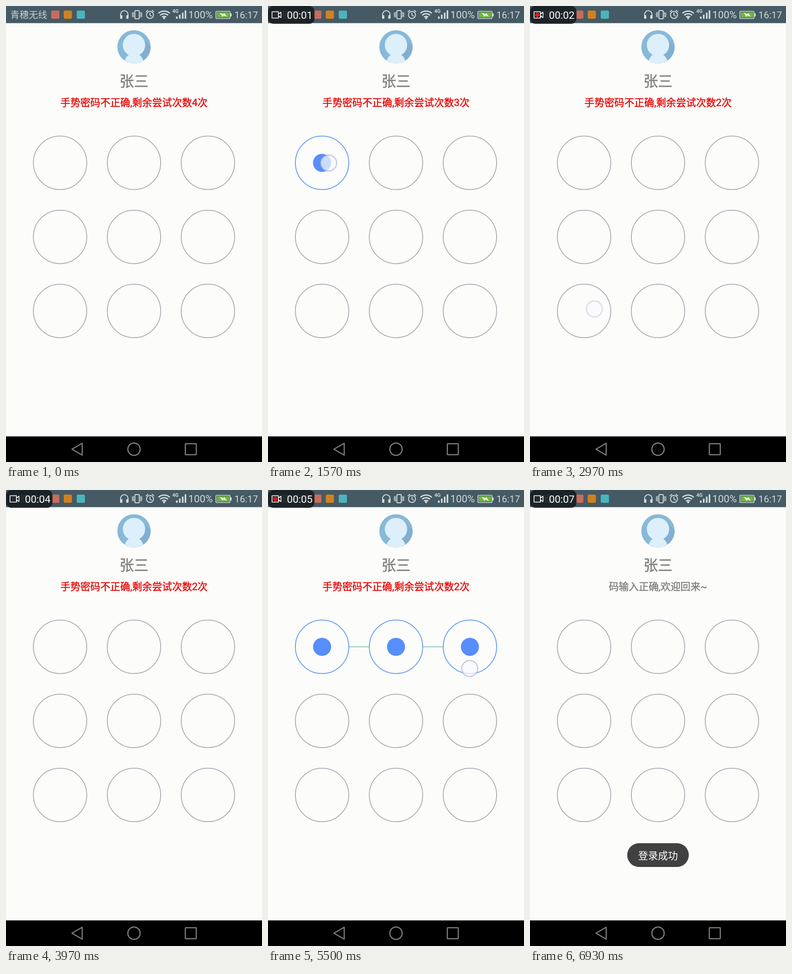
An HTML page that plays this animation: 561x998 px, repeating every 6960 ms.

```html
<!DOCTYPE html>
<html lang="zh-CN">
<head>
<meta charset="utf-8">
<title>手势密码</title>
<style>
  html, body { margin: 0; width: 100%; height: 100%; overflow: hidden; background: #fcfcfa; }
  svg { display: block; width: 100%; height: 100%; }
  text { font-family: Roboto, "Noto Sans CJK SC", "Noto Sans CJK", sans-serif; }
  .mid { text-anchor: middle; }
  .heavy { fill: #808080; stroke: #808080; stroke-width: .5; }
  .heavy.error { fill: #e60a0a; stroke: #e60a0a; }
  .line { fill: none; stroke: #d3dadd; stroke-width: 2; }
  .solid { fill: #d3dadd; }
  .nav { fill: none; stroke: #7e7e7e; stroke-width: 2.5; stroke-linejoin: round; }
  .node circle:first-child { fill: #fcfcfa; stroke: #a9abb4; stroke-width: 1.8; }
  .node circle:last-child { fill: #588efc; visibility: hidden; }
  .node.on circle:first-child { stroke: #6098f3; }
  .node.on circle:last-child { visibility: visible; }
  #trail line { stroke: #76afd0; stroke-width: 1.6; }
  #trail line.flat { stroke: #74b9a8; }
</style>
</head>
<body>
<svg viewBox="0 0 561 998" preserveAspectRatio="none">
  <defs>
    <clipPath id="round"><circle cx="280.5" cy="89.5" r="36.5"/></clipPath>
  </defs>
  <rect width="561" height="998" fill="#fcfcfa"/>

  <!-- status bar -->
  <rect width="561" height="37.5" fill="#455a64"/>
  <text x="9.5" y="27" font-size="20.2" fill="#c8d0d4">青穗无线</text>
  <rect x="99" y="10" width="18" height="18" rx="3" fill="#c66c5e"/>
  <rect x="126.5" y="10" width="18" height="18" rx="3" fill="#d0811f"/>
  <rect x="155" y="10" width="18" height="18" rx="3" fill="#4ab5bd"/>
  <g class="line">
    <path d="M251 23v-4a8 8.500 0 0 1 16.500 0v4"/>
    <rect x="282.500" y="10" width="9.500" height="18" rx="1.500"/>
    <path d="M279.500 13v12M295 13v12M276.500 14l1 2.500-1 2.500 1 2.500-1 2.500M298 14l-1 2.500 1 2.500-1 2.500 1 2.500" stroke-width="1.500"/>
    <circle cx="315.500" cy="19.500" r="7.700"/>
    <path d="M315.500 14.500v5.500l4 2.500M306.500 13l5-4M324.500 13l-5-4"/>
    <path d="M334 16a18.500 18.500 0 0 1 25 0M338 20.300a12.500 12.500 0 0 1 17 0M342 24.300a7 7 0 0 1 9 0" stroke-width="2.800"/>
    <rect x="460" y="11.500" width="31" height="16" rx="2" stroke-width="1.700"/>
  </g>
  <g class="solid">
    <rect x="250" y="20" width="5" height="8" rx="1.500"/>
    <rect x="263.500" y="20" width="5" height="8" rx="1.500"/>
    <circle cx="346.500" cy="26.500" r="2.400"/>
    <path d="M372.500 23h3.500v5h-3.500zM379 19h3.500v9h-3.500zM385.500 14.500h3.500v13.500h-3.500zM391.500 9.500h3.500v18.500h-3.500z"/>
    <rect x="491.500" y="16" width="3" height="7" rx="1"/>
    <text x="364.500" y="14.500" font-size="11" font-weight="700">4G</text>
    <text x="399.500" y="27" font-size="22.2">100%</text>
    <text x="500.500" y="27" font-size="20.8">16:17</text>
  </g>
  <rect x="462" y="13.500" width="27" height="12" fill="#6fb73c"/>
  <path d="M468 15l9 3 1-3 6 8-8-2-1 3z" fill="#eef4ea"/>

  <!-- profile -->
  <g clip-path="url(#round)">
    <rect x="244" y="53" width="73" height="73" fill="#87b9d8"/>
    <path d="M298 69l22 22v36h-22l-12-14z" fill="#82afd1"/>
    <path d="M259 127c1-14 8-23 21.500-23s20.500 9 21.500 23z" fill="#dceffb"/>
    <circle cx="280.500" cy="85.500" r="24.500" fill="#dceffb"/>
    <path d="M266 126v-6M295 126v-6" stroke="#b7d6ea"/>
  </g>
  <text class="mid heavy" x="280.500" y="175.500" font-size="31.800">张三</text>
  <text id="message" class="mid heavy" x="280.500" y="218.900" font-size="21.850"></text>

  <g id="trail"></g>
  <g id="nodes"></g>

  <g id="toast">
    <rect x="213" y="773" width="135" height="52" rx="26" fill="#414141"/>
    <text class="mid" x="280.500" y="807.500" font-size="21.800" fill="#fff">登录成功</text>
  </g>

  <!-- navigation bar -->
  <rect y="942" width="561" height="56" fill="#000"/>
  <g class="nav">
    <path d="M144.500 970l22.500-13v26z"/>
    <circle cx="280.500" cy="970" r="13.500"/>
    <rect x="393" y="958" width="24" height="24" rx="1"/>
  </g>

  <circle id="touch" r="17.500" fill="#f8faff" fill-opacity=".72" stroke="#a2a7d2" stroke-opacity=".6" stroke-width="2.500"/>

  <!-- recorder badge -->
  <g id="badge">
    <rect width="102" height="39" rx="12" fill="#14191c" fill-opacity=".85"/>
    <path d="M8.800 12.500h14v14h-14zM22.800 17.500l5.700-4v12l-5.700-4z" fill="none" stroke="#fff" stroke-width="1.600" stroke-linejoin="round"/>
    <circle id="rec" cx="15.800" cy="19.500" r="4.700" fill="#f01414"/>
    <text id="clock" x="41.500" y="27.800" font-size="22.500" fill="#fff"></text>
  </g>
</svg>
<script>
const LOOP = 6960, RADIUS = 58.5, FADE = 120;
const TICKS = [1200, 2230, 3000, 3870, 4870, 6070, 6900];
const BADGE_AT = 200, TOAST_AT = 6270, TOAST_FADE = 200;

// Finger paths as [time, x, y]; the last point is the release.
const GESTURES = [
  [[270, 112, 340], [380, 150, 343], [560, 282, 345], [640, 284, 400], [750, 281, 520],
   [890, 288, 655], [970, 310, 704], [1100, 311, 706]],
  [[1500, 108, 345], [1620, 150, 343], [1820, 290, 338], [1980, 398, 328], [2050, 396, 305],
   [2130, 380, 294], [2230, 372, 345], [2450, 295, 490], [2720, 145, 645], [2860, 141, 663], [2930, 141, 663]],
  [[4870, 122, 345], [4970, 155, 350], [5170, 280, 345], [5410, 432, 343], [5500, 442, 390],
   [5680, 441, 520], [5890, 445, 660], [6000, 447, 690], [6100, 448, 694]]
];

const $ = id => document.getElementById(id);
function add(parent, tag, attrs) {
  const el = document.createElementNS(parent.namespaceURI, tag);
  for (const key in attrs) el.setAttribute(key, attrs[key]);
  return parent.appendChild(el);
}

const nodes = Array.from({ length: 9 }, (_, i) => {
  const x = 118.5 + 162 * (i % 3), y = 343.2 + 162.1 * Math.floor(i / 3);
  const el = add($('nodes'), 'g', { class: 'node' });
  add(el, 'circle', { cx: x, cy: y, r: RADIUS });
  add(el, 'circle', { cx: x, cy: y, r: 19.8 });
  return { x, y, el };
});
const segments = nodes.map(() => add($('trail'), 'line', {}));

function along(path, t) {
  const i = path.findIndex(point => point[0] > t);
  if (i < 0) return { x: path.at(-1)[1], y: path.at(-1)[2] };
  const [t0, x0, y0] = path[i - 1], [t1, x1, y1] = path[i], k = (t - t0) / (t1 - t0);
  return { x: x0 + (x1 - x0) * k, y: y0 + (y1 - y0) * k };
}

// Each node joins the pattern when the finger first enters it.
const gestures = GESTURES.map(path => {
  const start = path[0][0], end = path.at(-1)[0], hits = [];
  for (let t = start; t < end; t += 5) {
    const p = along(path, t);
    for (const node of nodes) {
      const inside = Math.hypot(p.x - node.x, p.y - node.y) < RADIUS;
      if (inside && !hits.some(hit => hit.node === node)) hits.push({ t, node });
    }
  }
  return { path, start, end, hits };
});

function drawPattern(t) {
  const g = gestures.find(g => t >= g.start && t < g.end + FADE);
  const finger = g && along(g.path, t);
  const active = g && t < g.end ? g.hits.filter(hit => hit.t <= t).map(hit => hit.node) : [];
  nodes.forEach(node => node.el.classList.toggle('on', active.includes(node)));

  const points = active.length ? [...active, finger] : [];
  segments.forEach((line, i) => {
    const a = points[i], b = points[i + 1];
    line.style.display = b ? '' : 'none';
    if (!b) return;
    line.setAttribute('x1', a.x);
    line.setAttribute('y1', a.y);
    line.setAttribute('x2', b.x);
    line.setAttribute('y2', b.y);
    line.classList.toggle('flat', Math.abs(a.y - b.y) < 8);
  });

  $('touch').style.opacity = g ? Math.min(1, 1 - (t - g.end) / FADE) : 0;
  if (finger) $('touch').setAttribute('transform', `translate(${finger.x} ${finger.y})`);
}

function drawStatus(t) {
  const released = gestures.filter(g => t >= g.end).length;
  const done = released === gestures.length;
  $('message').textContent = done ? '码输入正确,欢迎回来~' : `手势密码不正确,剩余尝试次数${4 - released}次`;
  $('message').classList.toggle('error', !done);
  $('toast').style.opacity = Math.max(0, Math.min(1, (t - TOAST_AT) / TOAST_FADE));

  const seconds = TICKS.filter(tick => tick <= t).length;
  const lastTick = seconds ? TICKS[seconds - 1] : BADGE_AT;
  $('badge').style.display = t < BADGE_AT ? 'none' : '';
  $('clock').textContent = `00:0${seconds}`;
  $('rec').style.display = t - lastTick < 510 ? 'none' : '';
}

const origin = performance.now();
function frame() {
  const t = (performance.now() - origin) % LOOP;
  drawPattern(t);
  drawStatus(t);
  requestAnimationFrame(frame);
}
frame();
</script>
</body>
</html>
```
